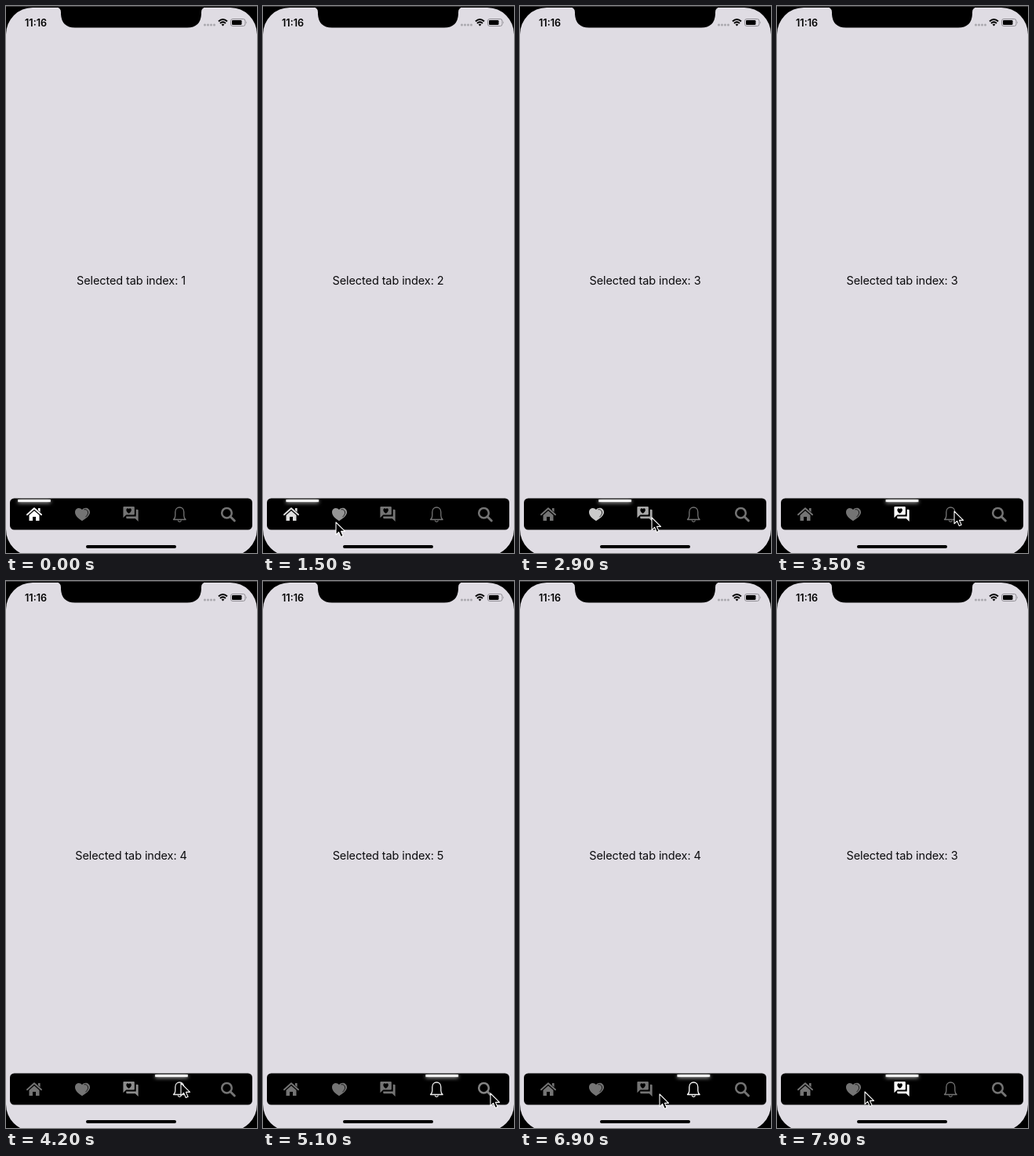
Animation, 320 px wide and 695 px high, one loop 8000 ms. Source, as an HTML page:

```html
<!DOCTYPE html>
<html lang="en">
<head>
<meta charset="utf-8">
<title>Tab bar</title>
<style>
  html, body { margin: 0; width: 100%; height: 100%; overflow: hidden; background: #000; }
  #stage { position: relative; width: 320px; height: 695px; overflow: hidden; }
  svg { position: absolute; inset: 0; }
  text, p { font-family: Inter, "Liberation Sans", sans-serif; }
  p {
    position: absolute; left: 0; top: 339px; width: 319px; margin: 0;
    font-size: 14.5px; line-height: 20px; letter-spacing: -.1px;
    text-align: center; white-space: pre; color: #0a0a0c;
  }

  /* One loop is 8 s, so 1% is 80 ms. */
  p::after { content: "1"; animation: digit 8s step-end infinite; }
  .tab { color: #747474; animation: 8s cubic-bezier(.42, 0, .58, 1) infinite; }
  #home { animation-name: home; }
  #heart { animation-name: heart; }
  #chat { animation-name: chat; }
  #bell { animation-name: bell; }
  #search { animation-name: search; }
  #marker { animation: marker 8s cubic-bezier(.42, 0, .58, 1) infinite; filter: drop-shadow(0 1px 2.5px #fffc); }
  #cursor { animation: cursor 8s ease-in-out infinite; }

  @keyframes digit {
    0% { content: "1"; }
    17.3% { content: "2"; }
    34.4% { content: "3"; }
    49.4% { content: "4"; }
    62.75% { content: "5"; }
    76.9% { content: "4"; }
    89.4%, 100% { content: "3"; }
  }
  @keyframes marker {
    0%, 17.3% { transform: translateX(0); }
    21.7%, 34.4% { transform: translateX(61.8px); }
    38.75%, 49.4% { transform: translateX(123.5px); }
    53.75%, 62.75% { transform: translateX(185.3px); }
    67.1%, 76.9% { transform: translateX(247px); }
    81.25%, 89.4% { transform: translateX(185.3px); }
    93.75%, 100% { transform: translateX(123.5px); }
  }
  @keyframes home {
    0%, 17.3% { color: #fff; }
    21.7%, 100% { color: #747474; }
  }
  @keyframes heart {
    0%, 17.3%, 38.75%, 100% { color: #747474; }
    21.7%, 34.4% { color: #fff; }
  }
  @keyframes chat {
    0%, 34.4%, 53.75%, 89.4% { color: #747474; }
    38.75%, 49.4%, 93.75%, 100% { color: #fff; }
  }
  @keyframes bell {
    0%, 49.4%, 67.1%, 76.9%, 93.75%, 100% { color: #747474; }
    53.75%, 62.75%, 81.25%, 89.4% { color: #fff; }
  }
  @keyframes search {
    0%, 62.75%, 81.25%, 100% { color: #747474; }
    67.1%, 76.9% { color: #fff; }
  }
  @keyframes cursor {
    0%, 2.5% { transform: translate(235px, 700px); animation-timing-function: ease-out; }
    10%, 15.2% { transform: translate(87px, 656px); }
    16.25%, 21.5% { transform: translate(93px, 656px); }
    26.25%, 27.6% { transform: translate(187px, 656px); }
    31.25%, 38.75% { transform: translate(168px, 650px); }
    43.75% { transform: translate(226px, 642px); }
    45% { transform: translate(224px, 641px); }
    47.5%, 52.5% { transform: translate(223px, 638px); }
    56.25%, 57.5% { transform: translate(293px, 651px); }
    60%, 70% { transform: translate(290px, 651px); }
    75%, 81.25% { transform: translate(223px, 652px); animation-timing-function: ease-in-out; }
    86.25% { transform: translate(178px, 652px); }
    87.5%, 93% { transform: translate(173px, 651px); }
    98.75%, 100% { transform: translate(112px, 649px); }
  }
</style>
</head>
<body>
<div id="stage">
  <svg width="320" height="695" viewBox="0 0 320 695">
    <rect width="320" height="695"/>
    <path d="M0 .5H320" stroke="#3a393b"/>
    <rect y="2" width="320" height="697" rx="34" fill="#dfdce3"/>
    <path d="M64 1.5Q70 2 70 8v2.500Q71 27.500 88 27.500H231Q248 27.500 249 10.500V8Q249 2 255 1.500Z"/>

    <text x="24" y="25.500" font-size="12.600" font-weight="600">11:16</text>
    <g fill="#a9a7ad">
      <circle cx="253.500" cy="24" r="1.500"/><circle cx="257.500" cy="24" r="1.500"/>
      <circle cx="261.500" cy="24" r="1.500"/><circle cx="265.500" cy="24" r="1.500"/>
    </g>
    <g fill="none" stroke="#000" stroke-width="2">
      <path d="M271 19.500Q276.500 14.500 282 19.500M273 22Q276.500 18.800 280 22"/>
      <path d="M274.600 23.500Q276.500 22 278.400 23.500L276.500 25.500Z" fill="#000" stroke="none"/>
    </g>
    <rect x="286.500" y="16.500" width="18.500" height="9" rx="2.600" fill="none" stroke="#8f8d93"/>
    <rect x="288" y="18" width="12.500" height="6" rx="1.300"/>
    <path d="M306 19.500q1.500 1.500 0 3Z" fill="#8f8d93"/>

    <rect x="5" y="625.500" width="309" height="40" rx="5.500"/>
    <rect x="102" y="685" width="115" height="4" rx="2"/>

    <g id="home" class="tab">
      <path d="M27 646.300 36 638.300 45 646.300" fill="none" stroke="currentColor" stroke-width="1.900" stroke-linecap="round" stroke-linejoin="round"/>
      <path d="M41 638h2.600v5L41 640.700ZM29.500 647 36 641.200 42.500 647V654H38v-5h-4v5h-4.500Z" fill="currentColor"/>
    </g>
    <g id="heart" class="tab">
      <path d="M97 654.300C92 651 88 647.500 88 643.200C88 637.500 94.500 636.300 97 640C100 636 107 637.500 107 643.200C107 647.500 102 651 97 654.300Z" fill="currentColor"/>
      <path d="M99.500 639.800C103 639 105.300 642 104.300 645.300Q103.500 647.500 101.500 649.300" fill="none" stroke="#000" stroke-width=".8"/>
    </g>
    <g id="chat" class="tab" transform="translate(147.500 634) scale(.96)">
      <path d="M21 6H19V15H6V17Q6 18 7 18H18L22 22V7Q22 6 21 6ZM17 12V3Q17 2 16 2H3Q2 2 2 3V17L6 13H16Q17 13 17 12Z" fill="currentColor"/>
      <path d="M9.500 11.300C4.500 8 6 4.200 8 4.400Q9.200 4.600 9.500 5.500Q9.800 4.600 11 4.400C13 4.200 14.500 8 9.500 11.300Z"/>
    </g>
    <g id="bell" class="tab" fill="none" stroke="currentColor" stroke-width="1.300" stroke-linejoin="round">
      <path d="M213.500 652.500Q215.800 650.500 215.800 647.500V643C215.800 639.500 218 637 221.300 637S226.800 639.500 226.800 643V647.500Q226.800 650.500 229.100 652.500Z"/>
      <path d="M219.200 653.500Q219.500 655.300 221.300 655.300T223.400 653.500"/>
    </g>
    <g id="search" class="tab" fill="none" stroke="currentColor">
      <circle cx="281.500" cy="644.200" r="6.300" stroke-width="2.500"/>
      <path d="M286 648.700 291.300 654" stroke-width="3" stroke-linecap="round"/>
    </g>

    <rect id="marker" x="15.200" y="627" width="41.600" height="3.200" fill="#fff"/>
  </svg>

  <p>Selected tab index: </p>

  <svg width="320" height="695" viewBox="0 0 320 695">
    <path id="cursor" d="M0 0V15.800L3.600 12.400 6.300 18.500 9.100 17.300 6.500 11.400H11.500Z" fill="#000" stroke="#fff" stroke-width="1.100" stroke-linejoin="round"/>
  </svg>
</div>
</body>
</html>
```
